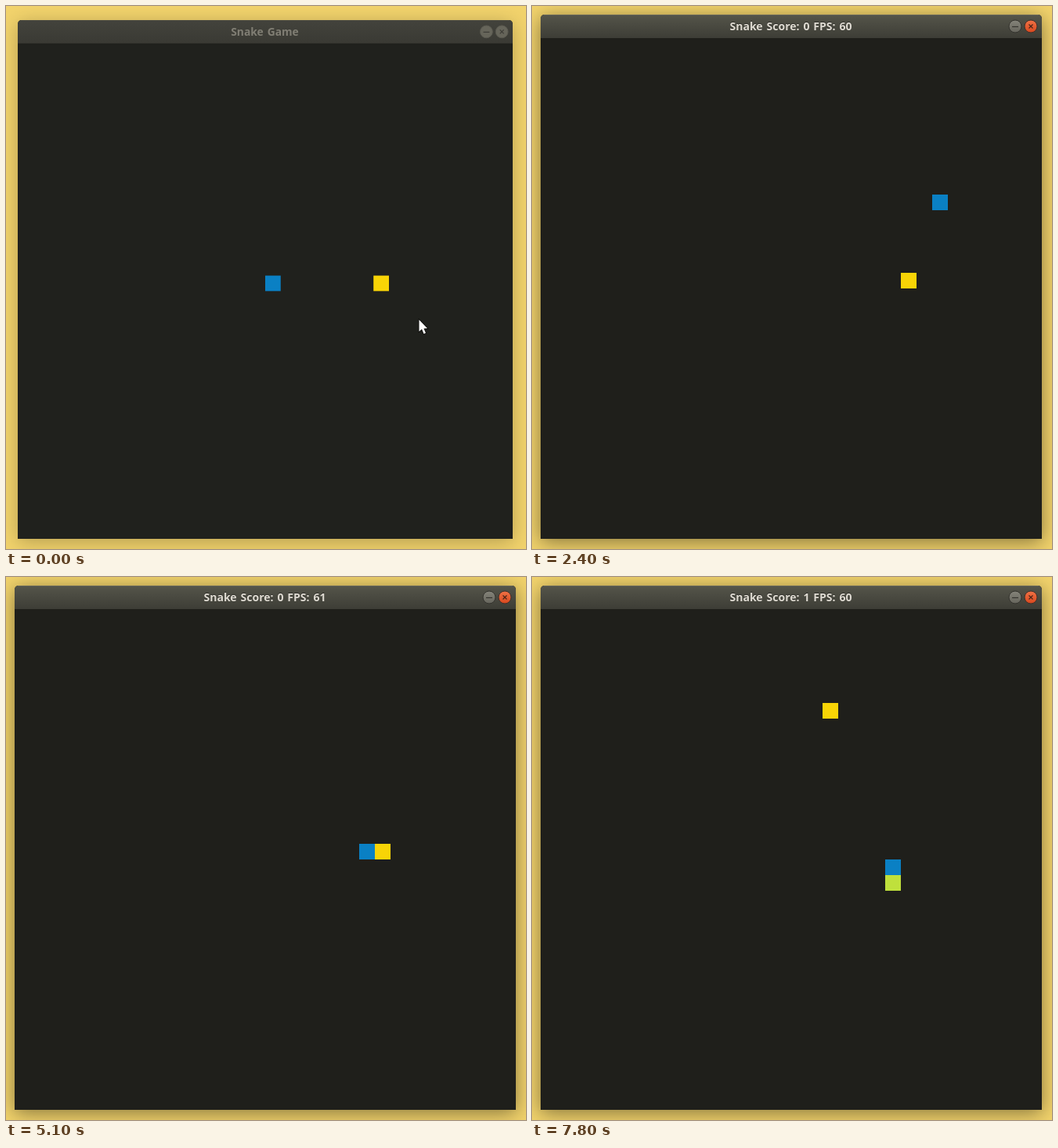
Write an HTML page with a canvas that moves like this. It is 664x694 px and loops after 8000 ms.

```html
<!DOCTYPE html>
<html lang="en">
<head>
<meta charset="utf-8">
<title>Snake</title>
<style>
html, body { margin: 0; width: 100%; height: 100%; overflow: hidden; background: #f0d16b; }
canvas { display: block; }
</style>
</head>
<body>
<canvas id="stage" width="664" height="694"></canvas>
<script>
const ctx = document.getElementById('stage').getContext('2d');
const LOOP = 8000, FRAME = 100, CELL = 20;
const BLUE = '#0a80c4', LIME = '#bfe03c', YELLOW = '#f8d406';
const DIRS = { U: [0, -1], D: [0, 1], L: [-1, 0], R: [1, 0] };

// Each run of moves: start time, time per cell, directions with counts
const RUNS = [
  [270, 160, 'U5 R9'],
  [2600, 200, 'R2 D4'],
  [3950, 160, 'D2 L5 U1 R3 D6 L3 U5'],
];
const path = [{ at: 0, x: 331, y: 341 }];
for (const [start, pace, moves] of RUNS) {
  let at = start;
  for (const [dir, ...count] of moves.split(' ')) {
    for (let i = 0; i < +count.join(''); i++, at += pace) {
      const { x, y } = path[path.length - 1], [dx, dy] = DIRS[dir];
      path.push({ at, x: x + dx * CELL, y: y + dy * CELL });
    }
  }
}
const firstFood = { x: 471, y: 341 }, nextFood = { x: 371, y: 161 };
const eatenAt = path.find(p => p.x === firstFood.x && p.y === firstFood.y).at;

// The caption refreshes about once a second
const FPS = [61, 60, 61, 60, 61, 60, 60];
function caption(t) {
  const n = Math.floor((t - 839) / 1017);
  if (n < 0) return 'Snake Game';
  return `Snake Score: ${n > 4 ? 1 : 0} FPS: ${FPS[n]}`;
}

function gradient(y0, y1, top, bottom) {
  const g = ctx.createLinearGradient(0, y0, 0, y1);
  g.addColorStop(0, top);
  g.addColorStop(1, bottom);
  return g;
}

function box(p, color) {
  ctx.fillStyle = color;
  ctx.fillRect(p.x, p.y, CELL, CELL);
}

function button(x, fill, edge, sign, lines) {
  ctx.beginPath();
  ctx.arc(x, 26, 8, 0, 7);
  ctx.fillStyle = fill;
  ctx.fill();
  ctx.lineWidth = 1;
  ctx.strokeStyle = edge;
  ctx.stroke();
  ctx.beginPath();
  for (const [x0, y0, x1, y1] of lines) {
    ctx.moveTo(x + x0, 26 + y0);
    ctx.lineTo(x + x1, 26 + y1);
  }
  ctx.lineWidth = 1.2;
  ctx.strokeStyle = sign;
  ctx.stroke();
}

function drawFrame(t, active) {
  ctx.save();
  ctx.shadowColor = `rgba(0,0,0,${active ? 0.45 : 0.25})`;
  ctx.shadowBlur = 24;
  ctx.shadowOffsetY = 4;
  ctx.fillStyle = active ? '#1f1f1b' : '#20211d';
  ctx.beginPath();
  ctx.roundRect(11, 11, 640, 670, [5, 5, 0, 0]);
  ctx.fill();
  ctx.restore();

  ctx.beginPath();
  ctx.roundRect(11, 11, 640, 30, [5, 5, 0, 0]);
  ctx.fillStyle = active ? gradient(11, 41, '#55554a', '#3d3d36') : gradient(11, 41, '#43433c', '#3a3a34');
  ctx.fill();
  ctx.fillStyle = active ? '#65655a' : '#4b4b43';
  ctx.fillRect(15, 11, 632, 1);

  ctx.font = '700 14px "Open Sans", "Noto Sans", sans-serif';
  ctx.wordSpacing = '1.3px';
  ctx.textAlign = 'center';
  const text = caption(t);
  if (active) {
    ctx.fillStyle = '#2c2c27';
    ctx.fillText(text, 330.5, 30);
  }
  ctx.fillStyle = active ? '#dfdbd2' : '#807e74';
  ctx.fillText(text, 330.5, 31);

  const dash = [[-4, 0.5, 4, 0.5]];
  const cross = [[-2.5, -2.5, 2.5, 2.5], [-2.5, 2.5, 2.5, -2.5]];
  if (active) {
    button(617, gradient(18, 34, '#85847a', '#66655c'), '#34332e', '#35342f', dash);
    button(637, gradient(18, 34, '#f07246', '#d9481e'), '#40302a', '#4a2418', cross);
  } else {
    button(617, '#66655a', '#5b5a50', '#3d3c36', dash);
    button(637, '#66655a', '#5b5a50', '#3d3c36', cross);
  }
}

function drawCursor() {
  ctx.beginPath();
  ctx.moveTo(527.5, 401);
  for (const [x, y] of [[527.5, 416], [531, 413], [533.5, 419], [536, 418], [533.5, 412.3], [538, 412]]) ctx.lineTo(x, y);
  ctx.closePath();
  ctx.lineWidth = 1.6;
  ctx.strokeStyle = '#0c0c0a';
  ctx.stroke();
  ctx.fillStyle = '#fff';
  ctx.fill();
}

function draw(t) {
  ctx.fillStyle = '#f2d36c';
  ctx.fillRect(0, 0, 664, 694);

  // The window grows to full size from its bottom centre
  const grow = t < 100 ? 1 : t < 200 ? 0.35 : 0;
  ctx.save();
  ctx.translate(331, 681);
  ctx.scale(1 - 0.0125 * grow, 1 - 0.0105 * grow);
  ctx.translate(-331, -681);
  drawFrame(t, t >= 200);

  const i = path.findLastIndex(p => p.at <= t);
  const eaten = t >= eatenAt;
  box(eaten ? nextFood : firstFood, YELLOW);
  if (eaten) box(path[i - 1], LIME);
  box(path[i], BLUE);
  ctx.restore();

  if (t < 400) drawCursor();
}

function tick() {
  draw(Math.floor(performance.now() % LOOP / FRAME) * FRAME);
  requestAnimationFrame(tick);
}
tick();
</script>
</body>
</html>
```
